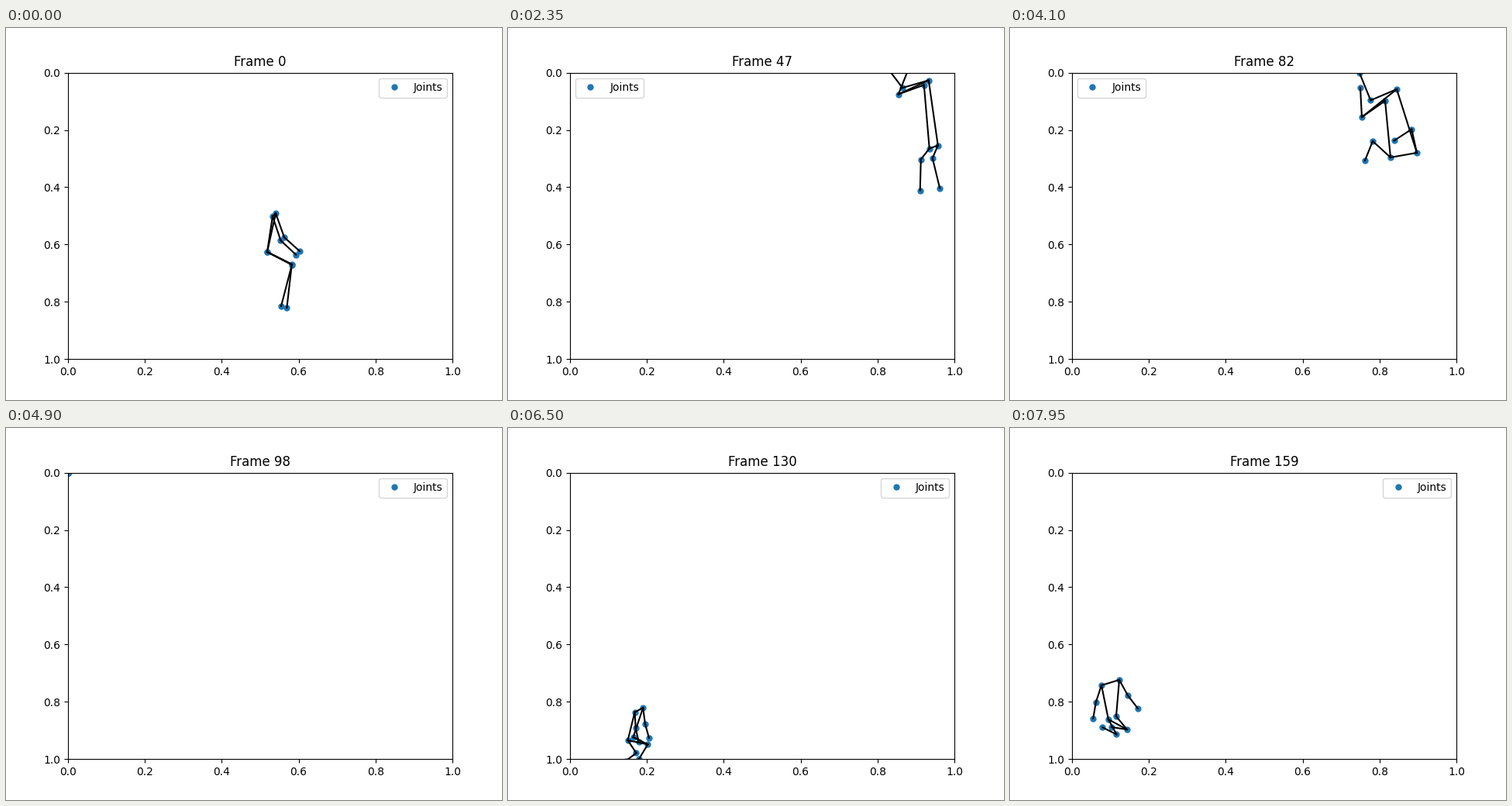
Write a matplotlib script that moves like this. It is 640x480 px and loops after 8 s.

```python
import numpy as np
import matplotlib.pyplot as plt
from matplotlib.animation import FuncAnimation

FRAMES = 160
INTERVAL = 50

# Axes rectangle on the 640 x 480 stage: left, top, width, height
LEFT, TOP, WIDTH, HEIGHT = 80, 57.6, 496, 369.6

# Points are x + yj in stage pixels. Joints of one side of the body:
# shoulder, elbow, wrist, hip, knee, ankle
LIMBS = [(0, 1), (1, 2), (0, 3), (3, 4), (4, 5)]
BONES = LIMBS + [(a + 6, b + 6) for a, b in LIMBS] + [(0, 6), (9, 4)]


def spin(degrees):
    return np.exp(1j * np.radians(degrees))


def swing(side, arm, thigh, shin):
    """Turn the arm about its shoulder, the thigh and shin about their tops."""
    shoulder, elbow, wrist, hip, knee, ankle = side
    new_knee = hip + (knee - hip) * spin(thigh)
    return np.array([shoulder,
                     shoulder + (elbow - shoulder) * spin(arm),
                     shoulder + (wrist - shoulder) * spin(arm),
                     hip, new_knee,
                     new_knee + (ankle - knee) * spin(shin)])


def body(side, shoulder_gap, hip_gap, *turns):
    """Add the far side: the near one set apart, its limbs swung."""
    gap = np.repeat([shoulder_gap, hip_gap], 3)
    return np.concatenate([side, swing(side, *turns) + gap])


def move(p, shift, scale=1):
    mid = p.mean()
    return mid + shift + (p - mid) * scale


sitting = np.array([141+325j, 152+345j, 165+362j, 137+372j, 151+389j, 131+386j])
standing = swing(sitting + 26j, 27, 0, -68)

rest = body(sitting, -23+7j, -10+4j, 47, 11, 18)
stand = body(standing, -14+5j, -7+5j, -12, 37, -19)
crouch = body([348+239j, 359+270j, 379+288j, 337+289j, 369+305j, 355+359j],
              -4+4j, 0, 1, 1, -8)
pike = body([492+179j, 481+193j, 480+233j, 485+97j, 452+109j, 466+74j],
            11-4j, 6-6j, -15, 4, -59)
flip = body([491+167j, 468+146j, 458+171j, 484+94j, 454+115j, 452+77j],
            34-6j, 15-15j, 35, 12, -19)
squat = body([210+372j, 215+391j, 221+405j, 188+400j, 212+401j, 199+422j],
             -7+6j, -7+3j, 25, 23, 57)

# Tracked stretches as {time: pose}; between them every joint reads (0, 0)
TRACKS = [
    {0: crouch, 15: move(crouch, 26-28j, 1.08)},
    {30: move(pike, 62+166j), 32: move(pike, 75+150j)},
    {38: move(pike, 72-22j), 50: move(pike, 45-24j)},
    {58: move(pike, 10+18j), 67: pike, 70: move(pike, 2+10j),
     82: flip, 88: move(flip, -2-24j, 0.8)},
    {108: move(squat, 18+12j), 116: squat, 143: stand,
     149: move(stand, -5-8j)},
    {154: move(rest, 4+17j), 159: rest},
]


def joints(i):
    """Joint positions in axes units for one frame."""
    for track in TRACKS:
        times = list(track)
        if times[0] <= i <= times[-1]:
            paths = np.array(list(track.values())).T
            p = np.array([np.interp(i, times, path) for path in paths])
            return (p.real - LEFT) / WIDTH, (p.imag - TOP) / HEIGHT
    return np.zeros((2, 12))


fig, ax = plt.subplots(figsize=(6.4, 4.8), dpi=100)


def draw(i):
    ax.clear()
    ax.set_xlim(0, 1)
    ax.set_ylim(1, 0)
    ax.set_title(f"Frame {i}")
    x, y = joints(i)
    ax.plot(x, y, "o", ms=5, label="Joints")
    for a, b in BONES:
        ax.plot([x[a], x[b]], [y[a], y[b]], "k-")
    ax.legend(loc="best")


anim = FuncAnimation(fig, draw, frames=FRAMES, init_func=lambda: draw(0),
                     interval=INTERVAL, repeat=True, repeat_delay=0)
plt.show()
```
